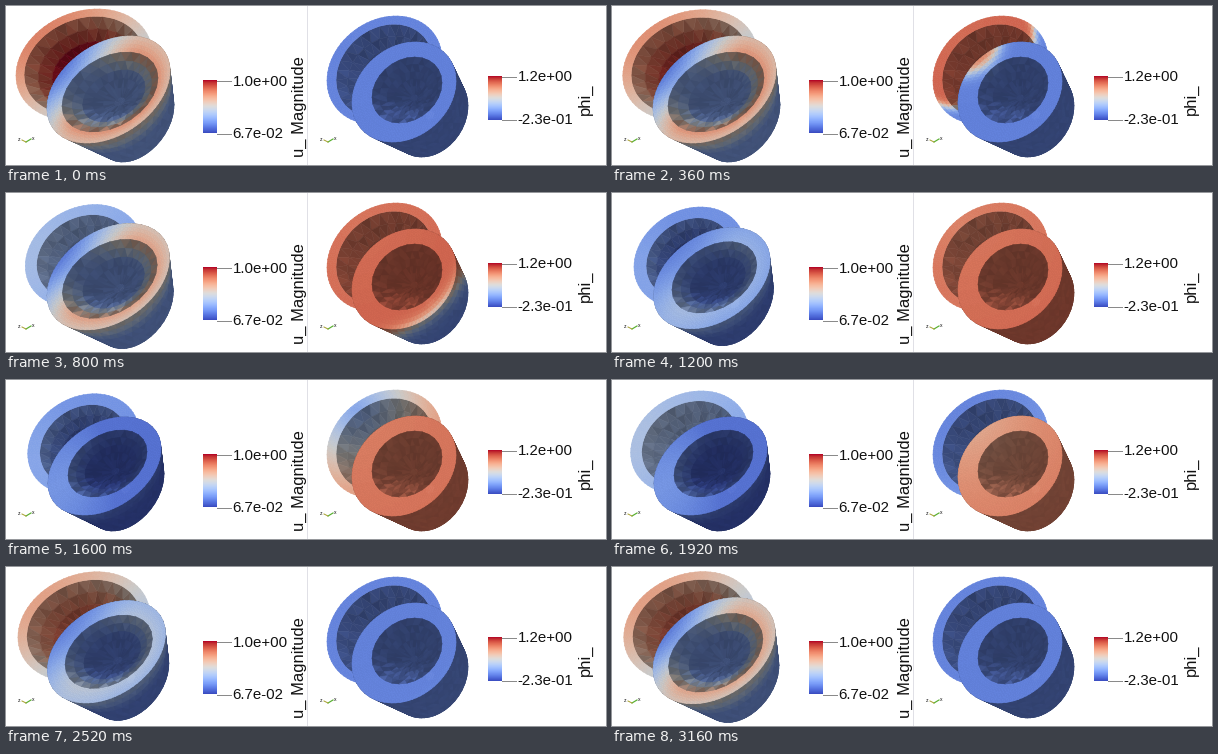
A matplotlib script that plays this animation: 600x159 px, repeating every 3200 ms.

```python
import numpy as np
import matplotlib.pyplot as plt
from matplotlib.animation import FuncAnimation
from matplotlib.collections import PolyCollection

W, H, DPI = 600, 159, 100
STEP, FRAMES = 40, 80
PX = 72 / DPI
CMAP = plt.get_cmap("coolwarm")
rng = np.random.default_rng(4)

# Boxes (x0 y0 x1 y1) of right chamber, left rim, left opening; then apex x1 y1
OPEN = np.array([10, 3, 146, 114, 41, 30, 164, 137, 56, 46, 152, 126, 168, 156])
SHUT = np.array([22, 14, 133, 114, 42, 37, 155, 135, 62, 50, 141, 117, 158, 151])
REST = np.array([321, 10, 436, 118, 346, 36, 450, 136, 366, 51, 436, 117,
                 462, 151])
ORIGIN = (350, 30)  # where the electric wave starts

# kind, chamber, from, to, columns, rows; in painting order
SHEETS = [
    ("cavity", "rv", "rv_in", "rv_pit", 30, 5),
    ("rim", "rv", "rv", "rv_in", 80, 3),
    ("cap", "lv", "core", "tip", 40, 3),
    ("body", "lv", "tip", "lv", 44, 6),
    ("rim", "lv", "lv", "hole", 80, 4),
    ("cavity", "lv", "hole", "pit", 28, 5),
]


def smooth(t, start, end):
    x = np.clip((t - start) / (end - start), 0, 1)
    return x * x * (3 - 2 * x)


def rv_open(t):
    return 1 - smooth(t, 230, 1050) + .85 * smooth(t, 1500, 2600)


def lv_open(t):
    return 1 - smooth(t, 650, 1550) + .9 * smooth(t, 2150, 2850)


def lerp(a, b, k):
    return a + (b - a) * k


def heart_pose(t):
    k = np.where(np.arange(OPEN.size) < 4, rv_open(t), lv_open(t))
    return lerp(SHUT, OPEN, k)


def shrink(box, dx=0., dy=0., k=.06):
    x0, y0, x1, y1 = box
    w, h = x1 - x0, y1 - y0
    cx, cy = (x0 + x1) / 2 + dx * w, (y0 + y1) / 2 + dy * h
    return np.array([cx - k * w, cy - k * h, cx + k * w, cy + k * h])


def boxes(pose, wall):
    rv, lv, hole = pose[:4], pose[4:8], pose[8:12]
    x1, y1 = pose[12:]
    rv_in = rv + wall * np.array([1, .9, -1, -.7])
    tip = np.array([x1 - 76, y1 - 84, x1, y1])
    return dict(rv=rv, rv_in=rv_in, rv_pit=shrink(rv_in, .15, .2), lv=lv,
                hole=hole, pit=shrink(hole, .1, .12), tip=tip,
                core=shrink(tip))


def ellipse(box, th, skew):
    x0, y0, x1, y1 = box
    x = (x0 + x1) / 2 + (x1 - x0) / 2 * np.cos(th)
    y = (y0 + y1) / 2 - (y1 - y0) / 2 * np.sin(th + skew)
    return np.stack([x, y], axis=-1)


def polar_grid(cols, rows):
    row = np.arange(rows + 1)[:, None]
    th = 2 * np.pi * (np.arange(cols + 1) + row / 2) / cols
    return th, np.broadcast_to(row / rows, th.shape)


def triangles(g):
    a, b, c, d = g[:-1, :-1], g[:-1, 1:], g[1:, :-1], g[1:, 1:]
    return np.stack([a, b, c, d, c, b], axis=2).reshape(-1, 3, g.shape[-1])


def mesh(pose, wall, tilt):
    box, out = boxes(pose, wall), []
    for _, chamber, a, b, cols, rows in SHEETS:
        th, k = polar_grid(cols, rows)
        skew = .2 if chamber == "rv" else tilt
        out.append(triangles(lerp(ellipse(box[a], th, skew),
                                  ellipse(box[b], th, skew), k[..., None])))
    return np.concatenate(out)


def lobe(ang, deg):
    return np.maximum(0, np.cos(ang - np.radians(deg)))


def surface():
    """Angle, depth, inwardness, chamber and light of every facet."""
    out = []
    for kind, chamber, _, _, cols, rows in SHEETS:
        th, k = polar_grid(cols, rows)
        ang = triangles(th[..., None]).mean(axis=(1, 2))
        k = triangles(k[..., None]).mean(axis=(1, 2))
        noise = rng.uniform(-1, 1, ang.size)
        depth = {"cavity": k, "rim": 0 * k, "cap": 0 * k + 1,
                 "body": 1 - k}[kind]
        inward = {"cavity": 0 * k + .5, "rim": k - .5}.get(kind, 0 * k - .5)
        if kind == "rim":
            light = 0 * k + .91
        elif kind != "cavity":
            light = .47 + .015 * noise
        elif chamber == "rv":
            light = .46 + .08 * lobe(ang, 215) + .05 * noise
        else:
            glow = lobe(ang, 250) ** 2 * (1 - k)
            light = .44 + .2 * glow + (.03 + .12 * glow) * noise
        is_rv = np.full(ang.size, chamber == "rv")
        out.append((ang, depth, inward, is_rv, light))
    return [np.concatenate(col) for col in zip(*out)]


ANG, DEPTH, INWARD, IS_RV, LIGHT = surface()
REST_MESH = mesh(REST, 9, .22)
DIST = np.hypot(*(REST_MESH.mean(axis=1) - ORIGIN).T)


def sigmoid(x):
    return 1 / (1 + np.exp(-np.clip(x, -50, 50)))


def potential(t):
    start = np.where(IS_RV, 50 + 4.3 * DIST, 162 + 5.36 * DIST)
    end = np.where(IS_RV, 1480 + 3 * DIST, 2000 + 1.6 * DIST)
    rise = sigmoid((t - start) / np.where(IS_RV, 9, 20))
    fall = sigmoid((end - t) / 78)
    plateau = .69 - .05 * np.clip((t - start) / 1000, 0, 2)
    return .16 + plateau * rise * fall


def displacement(t):
    rv = lerp(.2 + .06 * lobe(ANG, 200), .58 + .2 * np.cos(ANG - 2.3),
              rv_open(t))
    lv = lerp(.12 + .1 * lobe(ANG, 190),
              .66 - .45 * lobe(ANG, 140) ** 2 + .14 * INWARD, lv_open(t))
    rv_deep = lerp(.08, 1, rv_open(t))
    lv_deep = lerp(.06, .24, lv_open(t))
    rim = np.where(IS_RV, rv, lv)
    deep = np.where(IS_RV, rv_deep, lv_deep)
    return lerp(rim, deep, np.minimum(1, DEPTH * 2))


def paint(coll, value):
    rgb = CMAP(value)[:, :3] * LIGHT[:, None]
    coll.set_facecolor(rgb)
    coll.set_edgecolor(rgb)


fig = plt.figure(figsize=(W / DPI, H / DPI), dpi=DPI, facecolor="white")
ax = fig.add_axes([0, 0, 1, 1])
ax.axis("off")


def label(x, y, s, size=15, **kw):
    ax.text(x, y, s, fontsize=size * PX, family="Liberation Sans",
            color="#111111", **kw)


def legend(x, y0, y1, high, low, title, tx, ty):
    ax.imshow(np.linspace(1, 0, 128)[:, None], cmap=CMAP, aspect="auto",
              extent=(x, x + 14, y1, y0), vmin=0, vmax=1)
    for y, s in ((y0, high), (y1, low)):
        ax.plot([x + 14, x + 28], [y, y], color="#8a8a8a", lw=PX)
        label(x + 29.5, y + 4.5, s)
    label(tx, ty, title, 16.5, rotation=90, rotation_mode="anchor")


def triad(x, y):
    ax.plot([x, x + 5], [y, y - 3], color="#58b030", lw=1.2 * PX)
    ax.plot([x, x - 4], [y, y - 2], color="#a8a030", lw=PX)
    label(x - 8, y - 1, "z", 5)
    label(x + 6, y - 2, "x", 5)


legend(197, 75, 127.5, "1.0e+00", "6.7e-02", "u_ Magnitude", 298, 151)
legend(482, 70.5, 114, "1.2e+00", "-2.3e-01", "phi_", 584, 109)
triad(20, 136)
triad(322, 136)
ax.plot([300.5, 300.5], [0, H], color="#e0e0e6", lw=PX)

left, right = (PolyCollection(REST_MESH, linewidths=.4) for _ in range(2))
ax.add_collection(left)
ax.add_collection(right)
ax.set_xlim(0, W)
ax.set_ylim(H, 0)


def draw(i):
    t = i * STEP
    left.set_verts(mesh(heart_pose(t), lerp(12, 8, rv_open(t)), .36))
    paint(left, displacement(t))
    paint(right, potential(t))
    return left, right


anim = FuncAnimation(fig, draw, frames=FRAMES, interval=STEP, repeat=True,
                     repeat_delay=0, init_func=lambda: draw(0))
plt.show()
```
